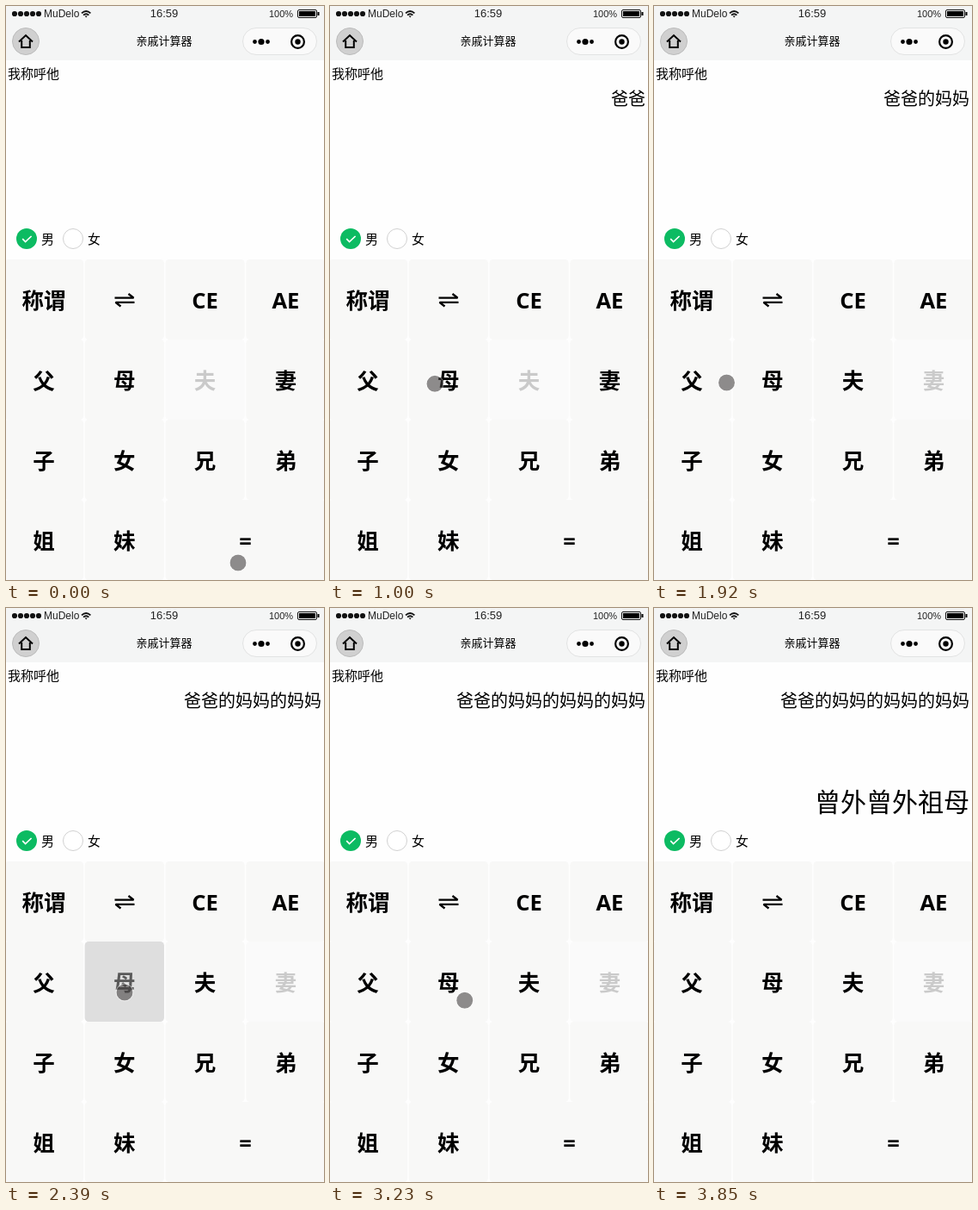
Recreate the animation shown at these times as an HTML page. Size 370x666 px, loop 4310 ms.

```html
<!DOCTYPE html>
<html lang="zh-CN">
<head>
<meta charset="utf-8">
<style>
html, body { margin: 0; width: 100%; height: 100%; overflow: hidden; background: #fefefe; }
svg { display: block; }
text { font-family: "Noto Sans CJK SC", "Noto Sans CJK", sans-serif; }
.bar { font-family: "Liberation Sans", Arial, sans-serif; fill: #222; }
.key rect { fill: #f8f8f7; }
.key text { font: bold 25.5px "Open Sans", "Noto Sans CJK SC", "Noto Sans CJK", sans-serif; text-anchor: middle; }
.key path { fill: none; stroke: #000; stroke-width: 2.4; stroke-linejoin: bevel; }
.off rect { fill: #fafafa; }
.off text { fill: #cacaca; }
.hit rect { fill: #dedede; }
.hit text { fill: rgba(0,0,0,.6); }
.hit path { stroke: rgba(0,0,0,.6); }
#dot { fill: rgba(64,60,60,.58); }
#ring { fill: none; stroke: rgba(255,255,255,.5); }
#halo { fill: rgba(255,255,0,.52); }
.down #dot { fill: rgba(50,50,0,.3); }
.down #ring, #cursor:not(.down) #halo { display: none; }
</style>
</head>
<body>
<svg width="370" height="666" viewBox="0 0 370 666">
  <rect width="370" height="63" fill="#f4f5f5"/>
  <!-- status bar -->
  <path d="M10 9h28.1" stroke="#111" stroke-width="6.2" stroke-linecap="round" stroke-dasharray="0 7"/>
  <text class="bar" x="44" y="13" font-size="12">MuDelo</text>
  <g fill="none" stroke="#111" stroke-width="1.8">
    <path d="M88 8.3q5.2-4.6 10.4 0M90 10.6q3.2-2.8 6.4 0"/>
    <path d="M91.6 11.4h3.2l-1.6 2z" fill="#111" stroke="none"/>
  </g>
  <text class="bar" x="184" y="13" font-size="13" text-anchor="middle">16:59</text>
  <text class="bar" x="306" y="13" font-size="11">100%</text>
  <rect x="339.5" y="4.5" width="22" height="9" rx="1.5" fill="none" stroke="#111"/>
  <path d="M341 6h19v6h-19zM362.5 7h2v4h-2z"/>
  <!-- title bar -->
  <circle cx="23" cy="41" r="15.5" fill="#d0d0d0" stroke="#bcbcbc"/>
  <path d="M15 41.5l8-7.5 8 7.5M18.2 40v8h9.6v-8" fill="none" stroke="#000" stroke-width="2"/>
  <text x="184" y="45" font-size="13" text-anchor="middle">亲戚计算器</text>
  <rect x="275.5" y="25.5" width="86" height="31" rx="15.5" fill="#fafafa" stroke="#e2e3e3"/>
  <circle cx="289.5" cy="41.5" r="2.4"/><circle cx="297" cy="41.5" r="3.6"/><circle cx="304.5" cy="41.5" r="2.4"/>
  <circle cx="339.5" cy="41.5" r="7.4" fill="none" stroke="#000" stroke-width="2.2"/>
  <circle cx="339.5" cy="41.5" r="3.2"/>
  <!-- display -->
  <text x="2" y="83.5" font-size="15">我称呼他</text>
  <text id="chain" x="367" y="115" font-size="20" text-anchor="end"></text>
  <text id="answer" x="367" y="235.5" font-size="30" text-anchor="end"></text>
  <circle cx="24" cy="270" r="12" fill="#0cbb62"/>
  <path d="M19.2 270.2l3.4 3.3 7-6.5" fill="none" stroke="#fff" stroke-width="1.7"/>
  <text x="41" y="276" font-size="15">男</text>
  <circle cx="78" cy="270" r="11.5" fill="#fff" stroke="#d1d1d1"/>
  <text x="95" y="276" font-size="15">女</text>
  <g id="keys"></g>
  <g id="cursor"><circle id="halo" r="12"/><circle id="dot" r="9.5"/><circle id="ring" r="10"/></g>
</svg>
<script>
const LOOP = 4310, STEP = 76.7;
const $ = id => document.getElementById(id);

const labels = ['称谓', '⇌', 'CE', 'AE', '父', '母', '夫', '妻', '子', '女', '兄', '弟', '姐', '妹', '='];
const arrows = '<path d="M126.5 338.6h22l-6-4.6M149.5 343.9h-22l6 4.6"/>';
$('keys').innerHTML = labels.map((label, i) => {
  const wide = label === '=' ? 93.8 : 0;
  const cx = 44 + 93.8 * (i % 4) + wide / 2, y = 294 + 93 * (i >> 2), w = 92.3 + wide;
  const face = label === '⇌' ? arrows : `<text x="${cx}" y="${y + 57}">${label}</text>`;
  return `<g class="key"><rect x="${cx - w / 2}" y="${y}" width="${w}" height="93" rx="4.5"/>${face}</g>`;
}).join('');
const keys = [...$('keys').children];

// Cursor legs: start time, number of steps, destination
const legs = [
  [70, 7, 54, 449.5], [620, 1, 53, 450], [770, 5, 130, 437], [1310, 1, 84.5, 436], [1390, 2, 53, 437],
  [1690, 2, 130, 437], [1840, 2, 84.5, 437], [2150, 3, 138, 446], [2460, 3, 136, 450],
  [2690, 4, 146, 443], [3230, 6, 291, 609]
];
// Clicks: mouse down, key takes effect, key
const clicks = [[620, 690, '父'], [1080, 1230, '母'], [2310, 2390, '母'], [3000, 3150, '母'], [3690, 3770, '=']];
const words = { 父: '爸爸', 母: '妈妈' };

function cursorAt(t) {
  let x = 270, y = 646;
  for (const [start, steps, toX, toY] of legs) {
    if (t < start) break;
    const p = Math.min(1, (Math.floor((t - start) / STEP + .15) + 1) / steps);
    const e = p * p * (3 - 2 * p);
    x += (toX - x) * e;
    y += (toY - y) * e;
  }
  return [x, y];
}

function draw() {
  const t = performance.now() % LOOP;
  const done = clicks.filter(c => t >= c[1]);
  const hit = done.find(c => t < c[1] + 80);
  const disabled = done.length > 1 ? '妻' : '夫';
  $('chain').textContent = done.map(c => words[c[2]]).filter(Boolean).join('的');
  $('answer').textContent = done.length === clicks.length ? '曾外曾外祖母' : '';
  keys.forEach((key, i) => {
    const state = hit && hit[2] === labels[i] ? ' hit' : labels[i] === disabled ? ' off' : '';
    key.setAttribute('class', 'key' + state);
  });
  const cursor = $('cursor');
  cursor.setAttribute('transform', `translate(${cursorAt(t)})`);
  cursor.setAttribute('class', clicks.some(c => t >= c[0] && t < c[1]) ? 'down' : '');
  cursor.setAttribute('visibility', t < 3850 ? 'visible' : 'hidden');
  requestAnimationFrame(draw);
}
draw();
</script>
</body>
</html>
```
